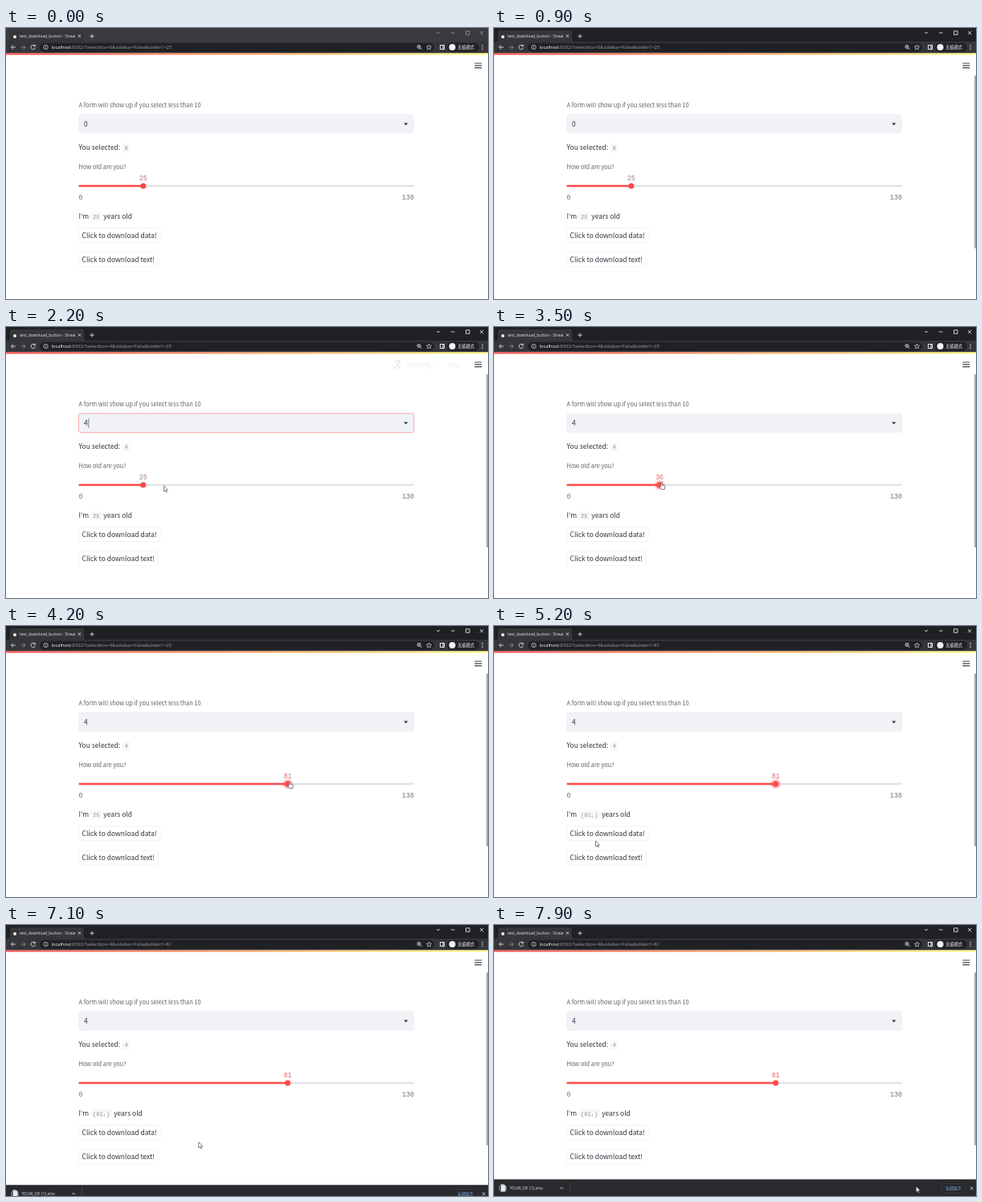
These frames come from a looping animation (600 px wide and 338 px high, 8 s). An HTML page:

```html
<!DOCTYPE html>
<html lang="en">
<head>
<meta charset="utf-8">
<title>Form demo</title>
<style>
  html, body { margin: 0; width: 100%; height: 100%; overflow: hidden; background: #fff; }
  svg { display: block; width: 600px; height: 338px; }
  text { fill: #31333f; font: 8.49px "Noto Sans CJK SC", "Noto Sans CJK JP", "Noto Sans", sans-serif; white-space: pre; }
  .label { font-size: 7.42px; fill: #5f6169; }
  .num { font: 8.3px "Liberation Mono", monospace; fill: #6f7178; }
  .code { font: 7.11px "Liberation Mono", monospace; fill: #8f9298; }
  .ui { font: 5px "Open Sans", "Noto Sans", sans-serif; fill: #e8eaed; }
  .ui.url { font-size: 5.8px; fill: #9aa0a6; }
  .cjk { font-size: 5.2px; fill: #fff; }
  .line { fill: none; stroke: #dfe1e5; stroke-width: .9; }
  .btn { fill: #fff; stroke: #ebebee; stroke-width: .6; }
  .hover .btn { stroke: #ff4b4b; }
  .hover text { fill: #ff4b4b; }
  .active .btn { fill: #ff4b4b; stroke: #ff4b4b; }
  .active text { fill: #fff; }
  #arrow, #hand { fill: #fff; stroke: #33353b; stroke-width: .6; stroke-linejoin: round; }
</style>
</head>
<body>
<svg viewBox="0 0 600 338">
  <defs>
    <linearGradient id="deco"><stop stop-color="#ff4b4b"/><stop offset="1" stop-color="#fffd80"/></linearGradient>
    <clipPath id="tabClip"><path d="M16 3h70.5v14H16z"/></clipPath>
    <clipPath id="listClip"><path d="M90 134h418v178H90z"/></clipPath>
    <filter id="blur" x="-50%" y="-50%" width="200%" height="200%"><feGaussianBlur stdDeviation=".8"/></filter>
    <filter id="shadow"><feDropShadow dx="0" dy="1.5" stdDeviation="2" flood-opacity=".16"/></filter>
  </defs>
  <rect width="600" height="338" fill="#fff"/>

  <!-- browser frame -->
  <rect id="strip" width="600" height="18"/>
  <path d="M2 17q3 0 3-3V5.500q0-2.500 2.500-2.500h87q2.500 0 2.500 2.500V14q0 3 3 3H600V31.500H0V17z" fill="#35363a"/>
  <rect x="42" y="18.700" width="491" height="11" rx="5.500" fill="#202124"/>
  <circle cx="11" cy="11" r="2" fill="#eee"/>
  <text class="ui" x="17" y="12.400" clip-path="url(#tabClip)">test_download_button - Streamlit</text>
  <g class="line">
    <path d="M90 8.500l3 3m0-3l-3 3M104.500 10.200h5m-2.500-2.500v5"/>
    <path d="M12 24H6.500m2.500-2.600L6.400 24 9 26.600"/>
    <path d="M18.500 24H24m-2.500-2.600l2.600 2.600-2.600 2.600" stroke="#8b8d91"/>
    <path d="M36 22.400a2.700 2.700 0 1 0 .4 2.300M36.300 20.800v2h-2"/>
    <path d="M49.500 23.500v2.200m0-3.600v.8" stroke-width=".7"/><circle cx="49.500" cy="24" r="2.700" stroke-width=".7"/>
    <circle cx="514" cy="23.400" r="2"/><path d="M515.500 25l2 2m-4.500-3.600h2"/>
    <path d="M526.500 21l.9 2 2.200.2-1.700 1.500.5 2.200-1.900-1.200-1.900 1.200.5-2.200-1.700-1.500 2.200-.2z" stroke-width=".7"/>
    <path d="M540.500 21.500h5v5h-5zM544 21.500v5" stroke="#fff"/>
  </g>
  <g class="line" id="controls">
    <path d="M536 5l2 2 2-2M554 6h4.500M572.500 3.800h4.500v4.500h-4.500zM590 4l4.300 4.300m0-4.300L590 8.300"/>
  </g>
  <rect x="549" y="18.700" width="40" height="11" rx="5.500" fill="#202124"/>
  <circle cx="555.500" cy="24" r="4" fill="#f1f3f4"/>
  <text class="cjk" x="562.300" y="26">无痕模式</text>
  <path d="M593 21v1.200m0 1.200v1.200m0 1.200V27" stroke="#e8eaed" stroke-width="1.200"/>
  <text class="ui url" x="56.500" y="26"><tspan fill="#fff">localhost</tspan><tspan id="url"></tspan></text>
  <rect y="31.500" width="600" height="2" fill="url(#deco)"/>

  <!-- page -->
  <path d="M583.300 44h9m-9 2.800h9m-9 2.800h9" stroke="#43454e" stroke-width="1.200"/>
  <g id="running">
    <path d="M483 44l3-1.500 3 1.500-2 4 2.500 1.500v3M486.500 48l-1 3h-3.500M489 45l3 1.500" fill="none" stroke="#31333f" stroke-width="1.200"/>
    <circle cx="489.500" cy="41.800" r="1.200"/>
    <text class="label" x="499" y="49.700">Running...</text>
    <text class="label" x="550" y="49.700">Stop</text>
  </g>
  <rect id="scroll" x="598" y="59" width="2" height="216" rx="1" fill="#a9a9ab"/>

  <text class="label" x="90.500" y="98.800">A form will show up if you select less than 10</text>
  <rect id="select" x="90.500" y="107.800" width="417.300" height="23.700" rx="2.400" fill="#f0f2f6" stroke-width=".7"/>
  <text id="value" x="97" y="123"></text>
  <path id="caret" d="M102.800 114v11.500" stroke="#31333f" stroke-width=".6"/>
  <path d="M495.200 118.600h5.200l-2.600 2.800z" fill="#31333f"/>

  <text x="90.500" y="152">You selected:</text>
  <rect x="144.700" y="144" width="10" height="11.500" rx="1.600" fill="#f7f8fa"/>
  <text class="code" id="chosen" x="147.500" y="152.200"></text>

  <text class="label" x="90.500" y="175.800">How old are you?</text>
  <text class="num" id="age" y="190.300" text-anchor="middle"></text>
  <rect x="90.500" y="195.800" width="417.500" height="2.400" rx="1" fill="#e2e3e8"/>
  <rect id="fill" x="90.500" y="195.800" height="2.400" rx="1" fill="#ff4b4b"/>
  <circle id="halo" cy="197" r="5.600" fill="#ff4b4b" opacity=".5" filter="url(#blur)"/>
  <circle id="thumb" cy="197" r="3.600" fill="#ff4b4b"/>
  <text class="num" x="90.500" y="213.700">0</text>
  <text class="num" x="508" y="213.700" text-anchor="end">130</text>

  <text x="90.500" y="237.500">I'm</text>
  <rect id="ageBox" x="105.100" y="229.500" height="11.500" rx="1.600" fill="#f7f8fa"/>
  <text class="code" id="ageCode" x="107.900" y="237.700"></text>
  <text id="tail" y="237.500">years old</text>

  <g id="data">
    <rect class="btn" x="90.700" y="249.700" width="101.200" height="17.800" rx="1.800"/>
    <text x="94.500" y="262.100">Click to download data!</text>
  </g>
  <rect class="btn" x="90.700" y="280" width="98.600" height="17.800" rx="1.800"/>
  <text x="94.500" y="292.400">Click to download text!</text>

  <!-- option list -->
  <g id="list">
    <rect x="90.500" y="134" width="417.300" height="178" rx="2.400" fill="#fff" filter="url(#shadow)"/>
    <g id="options" clip-path="url(#listClip)"></g>
  </g>

  <!-- download bar -->
  <g id="bar">
    <rect y="317.300" width="600" height="21" fill="#292a2d"/>
    <path d="M0 317.500H600" stroke="#45464a" stroke-width=".5"/>
    <path d="M8.500 323.500h4l2 2v7h-6z" fill="#e8eaed"/>
    <circle cx="11" cy="328.300" r="4.500" fill="none" stroke="#8e9fb2" stroke-width="1"/>
    <text class="ui" x="19.500" y="330.200" style="font-size:5.300px">YOUR_DF (1).xlsx</text>
    <path class="line" d="M82 329.300l2-2 2 2M592.800 326.500l3.600 3.600m0-3.600l-3.600 3.600"/>
    <path d="M94.500 320v16" stroke="#55565a" stroke-width=".5"/>
    <rect x="557" y="322.500" width="30" height="12" rx="1.800" fill="none" stroke="#3c3e42" stroke-width=".6"/>
    <text class="cjk" x="562" y="330.300" style="font-size:4.900px;fill:#8ab4f8">全部显示</text>
  </g>

  <path id="arrow" d="M0 0V7.200L1.700 5.700 2.800 8.200 3.900 7.700 2.800 5.300H5.100z"/>
  <path id="hand" d="M-.8 4.500V.6a.8.8 0 0 1 1.600 0V3.200l2.800.7q.8.2.7 1L3.800 8.500H.2L-2.200 5.300q.4-1.200 1.400-.8z"/>
</svg>
<script>
const $ = id => document.getElementById(id);
const set = (id, attrs) => { for (const k in attrs) $(id).setAttribute(k, attrs[k]); };
const show = (id, on) => { $(id).style.display = on ? '' : 'none'; };
const within = (t, a, b) => t >= a && t < b;

const LOOP = 8000, ROW = 23.7, LIST_TOP = 138.7;
const agePath = [[2900, 25], [3500, 36], [3600, 38], [4200, 81]];
const mousePath = [
  [1000, 430, 215], [1300, 215, 119], [1600, 205, 243], [1900, 205, 243],
  [2200, 196.5, 198], [2700, 173, 194], [4400, 352.6, 194], [5200, 126.5, 268],
  [5600, 150, 259], [6000, 172, 258.5], [6300, 172, 258.5], [6400, 176, 258.5],
  [6800, 176, 258.5], [7900, 525.5, 326]
];

// Value of a keyed path at time t, one entry per dimension
function at(path, t, ease) {
  const i = path.findIndex(p => p[0] > t);
  if (i === 0) return path[0].slice(1);
  if (i < 0) return path[path.length - 1].slice(1);
  const a = path[i - 1], b = path[i];
  let k = (t - a[0]) / (b[0] - a[0]);
  if (ease) k = k * k * (3 - 2 * k);
  return a.slice(1).map((v, j) => v + (b[j + 1] - v) * k);
}

$('options').innerHTML = [...Array(8).keys()].map(i => {
  const y = LIST_TOP + i * ROW;
  return `<rect id="row${i}" x="90.500" y="${y}" width="417.300" height="${ROW}"/>` +
    `<text x="100" y="${y + 15}">${i}</text>`;
}).join('');

function draw(t) {
  const focused = t >= 900;
  set('strip', { fill: focused ? '#202124' : '#3a3b3e' });
  set('controls', { opacity: focused ? 1 : .5 });
  show('scroll', t >= 400);

  const age = Math.round(at(agePath, t)[0]), x = 90.5 + 417.5 * age / 130;
  const dragging = within(t, 2700, 4400);
  const [mx, my] = dragging ? [x + 2.5, 194] : at(mousePath, t, true);

  // select box
  const open = within(t, 1400, 2000), picked = t >= 2100 ? 4 : 0;
  set('select', { stroke: within(t, 1300, 2800) ? '#ff8a8a' : '#f0f2f6' });
  $('value').textContent = t >= 2000 ? 4 : 0;
  show('caret', within(t, 1300, 2800));
  show('list', open);
  const over = my < 134 ? 0 : Math.floor((my - LIST_TOP) / ROW);
  for (let i = 0; i < 8; i++) set('row' + i, { fill: i === over ? '#f0f2f6' : '#fff' });
  $('chosen').textContent = picked;

  // slider and its result
  const done = t >= 4400, code = done ? '(81,)' : '25', w = 5.7 + 4.27 * code.length;
  $('age').textContent = age;
  set('age', { x });
  $('age').style.fill = age > 25 ? '#d9696d' : '#a07b7e';
  set('fill', { width: x - 90.5 });
  set('thumb', { cx: x });
  set('halo', { cx: x });
  show('halo', within(t, 2800, 6700));
  $('ageCode').textContent = code;
  set('ageBox', { width: w });
  set('tail', { x: 107.1 + w });
  $('url').textContent = `:8502/?selectbox=${picked}&sidebar=False&slider1=${done ? 81 : 25}`;

  const runStart = done ? 4400 : 2100;
  set('running', { opacity: within(t, runStart, runStart + 500) ? .12 : 0 });

  // download
  const overData = t > 5200 && mx < 192 && my < 267.5;
  $('data').setAttribute('class', within(t, 6700, 6900) ? 'active' : overData ? 'hover' : '');
  const slide = Math.min(1, Math.max(0, (t - 6900) / 300));
  set('bar', { transform: `translate(0 ${21 * (1 - slide)})` });

  // pointer
  const hand = (open && my > 134) || within(t, 2500, 4500) || overData;
  show('hand', t >= 1000 && hand);
  show('arrow', t >= 1000 && !hand);
  set(hand ? 'hand' : 'arrow', { transform: `translate(${mx} ${my})` });
}

const start = performance.now();
function tick() {
  const t = (performance.now() - start) % LOOP;
  draw(Math.floor(t / 100) * 100);
  requestAnimationFrame(tick);
}
tick();
</script>
</body>
</html>
```
